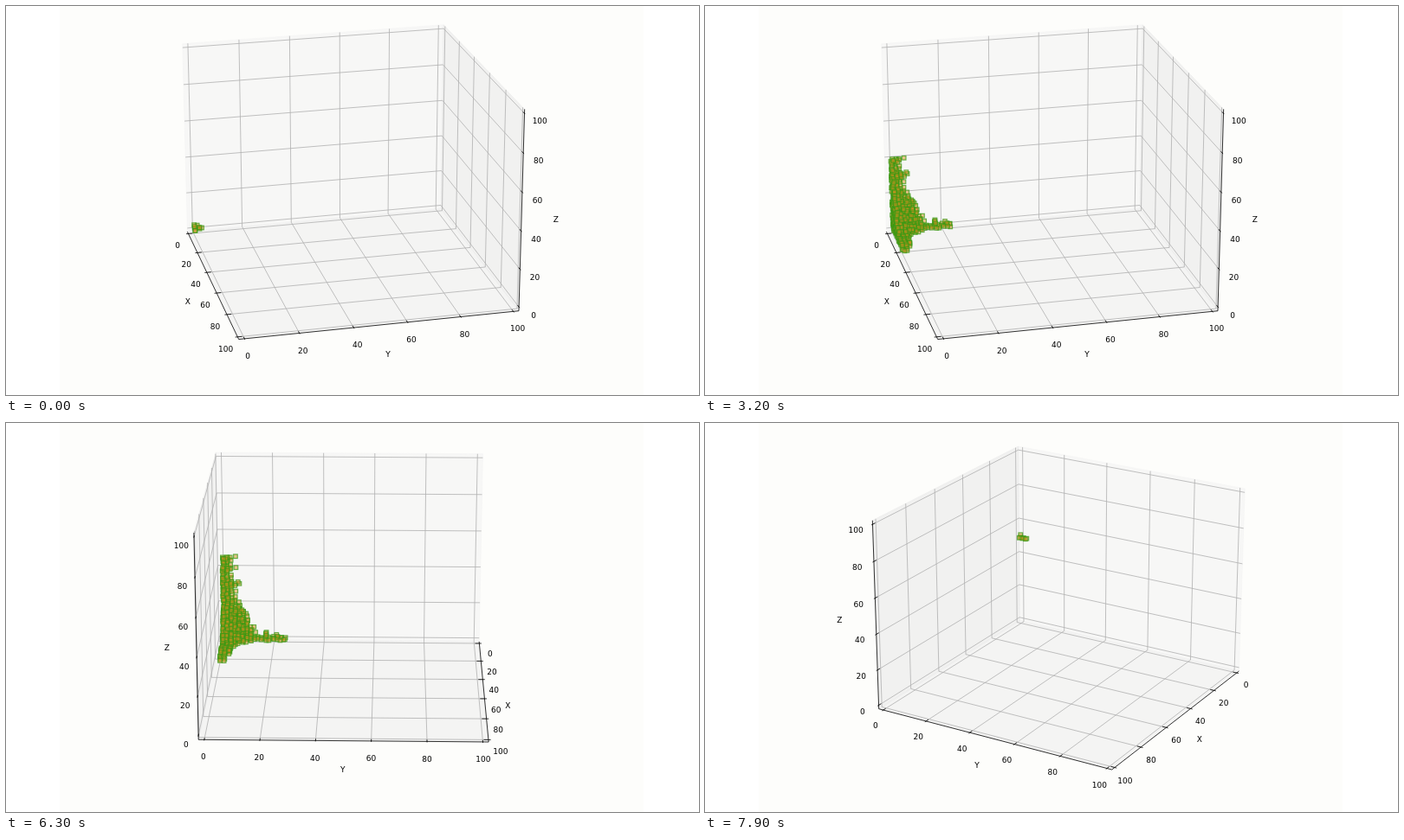
These frames come from a looping animation (800x450 px, 8 s). An HTML page with a canvas:

```html
<!DOCTYPE html>
<html lang="en">
<head>
<meta charset="utf-8">
<title>Voxel growth</title>
<style>
  html, body { margin: 0; width: 100%; height: 100%; overflow: hidden; background: #fff; }
  canvas { display: block; width: 800px; height: 450px; }
</style>
</head>
<body>
<canvas id="stage" width="800" height="450"></canvas>
<script>
const ctx = document.getElementById('stage').getContext('2d');
const LOOP = 8000, STEP = 100, CUT = 7800;
const LO = -100 / 48, HI = 100 - LO;
const TICKS = [0, 20, 40, 60, 80, 100];
const SIZE = [1.1429, 1.1429, 0.8571];
const CELL = 1.5, RAD = Math.PI / 180;

// time, azimuth and elevation of the first view
const TURN = [
  [4900, -13.7, 20.8], [5400, -2, 19.3], [6300, 1.2, 19],
  [7200, 14.5, 21.4], [7300, 14.5, 21.4], [7700, 20, 21.6]
];

function turn(t) {
  if (t <= TURN[0][0]) return TURN[0].slice(1);
  for (let i = 1; i < TURN.length; i++) {
    const [t0, a0, e0] = TURN[i - 1], [t1, a1, e1] = TURN[i];
    const f = (t - t0) / (t1 - t0);
    if (t <= t1) return [a0 + (a1 - a0) * f, e0 + (e1 - e0) * f];
  }
  return TURN[TURN.length - 1].slice(1);
}

function camera(azim, elev, scale, cx, cy) {
  const ca = Math.cos(azim * RAD), sa = Math.sin(azim * RAD);
  const ce = Math.cos(elev * RAD), se = Math.sin(elev * RAD);
  return p => {
    const [x, y, z] = p.map((v, i) => (v / 100 - 0.5) * SIZE[i]);
    const depth = 10 - ce * (ca * x + sa * y) - se * z;
    const right = ca * y - sa * x;
    const up = ce * z - se * (ca * x + sa * y);
    return [cx + scale * right / depth, cy - scale * up / depth, depth];
  };
}

function seeded(seed) {
  return () => {
    seed = (seed + 0x6D2B79F5) | 0;
    let n = Math.imul(seed ^ (seed >>> 15), 1 | seed);
    n ^= n + Math.imul(n ^ (n >>> 7), 61 | n);
    return ((n ^ (n >>> 14)) >>> 0) / 4294967296;
  };
}

// a corner blob with one arm along each axis
function growCells() {
  const rand = seeded(11), cells = [];
  const jitter = () => (rand() - 0.5) * 0.8;
  for (let k = 0; k <= 30; k++) {
    const z = k * CELL;
    const wide = (z < 33 ? 2 : 1) + Math.floor(rand() * 2.7);
    for (let i = 0; i <= 18; i++) for (let j = 0; j <= 16; j++) {
      const x = i * CELL, y = j * CELL;
      const blob = (x / 13) ** 1.2 + (y / 13) ** 1.2 + (z / 28) ** 1.2;
      const inBlob = blob < 0.85 + 0.3 * rand();
      const column = i < 3 && j <= wide - i && (j < 2 || rand() < 0.8);
      const bump = j === 11 ? 2 : j === 14 ? 1 : 0;
      const bar = i < 3 && k <= (i < 2 ? bump : 0);
      const spur = j < (i < 14 ? 3 : 2) && k < (i < 15 ? 2 : 1);
      if (!(inBlob || column || bar || spur)) continue;
      const reach = Math.max(z / 46, (y / 25.5) ** 1.43, (x / 27) ** 1.43);
      const birth = inBlob ? Math.max(reach, blob * 0.35) : reach;
      cells.push({ p: [x + 0.5 + jitter(), y + 0.3 + jitter(), z + 0.9 + jitter()], birth });
    }
  }
  return cells;
}

const grown = growCells();
const sprout = [0, 1.5, 3]
  .flatMap(y => [[0, y, 50], [1.5, y + 0.3, 50.4]])
  .concat([[0, 0, 51.5]])
  .map(p => ({ p, birth: 0 }));

function growth(t) {
  const s = Math.min(t, 4500) / 1000;
  return (2.9 + 16.32 * s - 1.498 * s * s) / 46;
}

function trace(project, points) {
  ctx.beginPath();
  points.forEach(p => {
    const [x, y] = project(p);
    ctx.lineTo(x, y);
  });
}

function line(project, points, color, width) {
  trace(project, points);
  ctx.strokeStyle = color;
  ctx.lineWidth = width;
  ctx.stroke();
}

function pane(project, points, color) {
  trace(project, points);
  ctx.closePath();
  ctx.fillStyle = ctx.strokeStyle = color;
  ctx.lineWidth = 0.9;
  ctx.fill();
  ctx.stroke();
}

function label(project, text, p) {
  const [x, y] = project(p);
  ctx.fillStyle = '#000';
  ctx.fillText(text, x, y + 0.5);
}

function drawBox(project, azim) {
  const flip = azim > 0;
  const far = flip ? LO : HI;     // the side wall
  const near = flip ? HI : LO;    // the open side
  const side = flip ? 1 : -1;     // outward from the open side

  pane(project, [[LO, LO, LO], [LO, HI, LO], [LO, HI, HI], [LO, LO, HI]], 'rgba(242,242,242,.5)');
  pane(project, [[LO, far, LO], [HI, far, LO], [HI, far, HI], [LO, far, HI]], 'rgba(230,230,230,.5)');
  pane(project, [[LO, LO, LO], [HI, LO, LO], [HI, HI, LO], [LO, HI, LO]], 'rgba(236,236,236,.5)');

  for (const t of TICKS) {
    const grid = points => line(project, points, '#b0b0b0', 0.8);
    grid([[t, near, LO], [t, far, LO], [t, far, HI]]);
    grid([[HI, t, LO], [LO, t, LO], [LO, t, HI]]);
    grid([[LO, near, t], [LO, far, t], [HI, far, t]]);
  }

  const ink = points => line(project, points, '#000', 0.8);
  ink([[LO, near, LO], [HI, near, LO]]);
  ink([[HI, LO, LO], [HI, HI, LO]]);
  ink([[HI, far, LO], [HI, far, HI]]);

  const out = 0.83, inn = 1.67;
  for (const t of TICKS) {
    ink([[t, near + side * out, LO], [t, near - side * inn, LO]]);
    ink([[HI + out, t, LO], [HI - inn, t, LO]]);
    ink([[HI + out, far, t], [HI - inn, far, t]]);
    label(project, t, [t, near + side * 4.4, LO - 6]);
    label(project, t, [HI + 5.5, t, LO - 6]);
    label(project, t, [HI + 5.3, far - side * 4, t - 2]);
  }
  label(project, 'X', [50, near + side * 9.3, LO - 9]);
  label(project, 'Y', [HI + 10.7, 50, LO - 9.1]);
  label(project, 'Z', [HI + 10.5, far - side * 9.4, 50]);
}

function drawCells(project, cells, level) {
  ctx.fillStyle = 'rgba(212,146,32,.5)';
  ctx.strokeStyle = 'rgba(54,154,20,.72)';
  ctx.lineWidth = 1.2;
  cells.filter(c => c.birth <= level)
    .map(c => project(c.p))
    .sort((a, b) => b[2] - a[2])
    .forEach(([x, y]) => {
      ctx.fillRect(x - 2.3, y - 2.3, 4.6, 4.6);
      ctx.strokeRect(x - 2.3, y - 2.3, 4.6, 4.6);
    });
}

function draw(t) {
  ctx.fillStyle = '#fff';
  ctx.fillRect(0, 0, 800, 450);
  ctx.fillStyle = '#fdfdfb';
  ctx.fillRect(62, 0, 674, 450);
  ctx.font = '9px "DejaVu Sans", sans-serif';
  ctx.textAlign = 'center';
  ctx.textBaseline = 'middle';

  const second = t >= CUT;
  const [azim, elev] = second ? [30.7, 22] : turn(t);
  const project = second ? camera(azim, elev, 2590, 412.5, 203) : camera(azim, elev, 2697, 393, 194.3);
  drawBox(project, azim);
  drawCells(project, second ? sprout : grown, growth(t));
}

const start = performance.now();
function tick() {
  const t = Math.max(0, performance.now() - start) % LOOP;
  draw(Math.floor(t / STEP) * STEP);
  requestAnimationFrame(tick);
}
tick();
</script>
</body>
</html>
```
